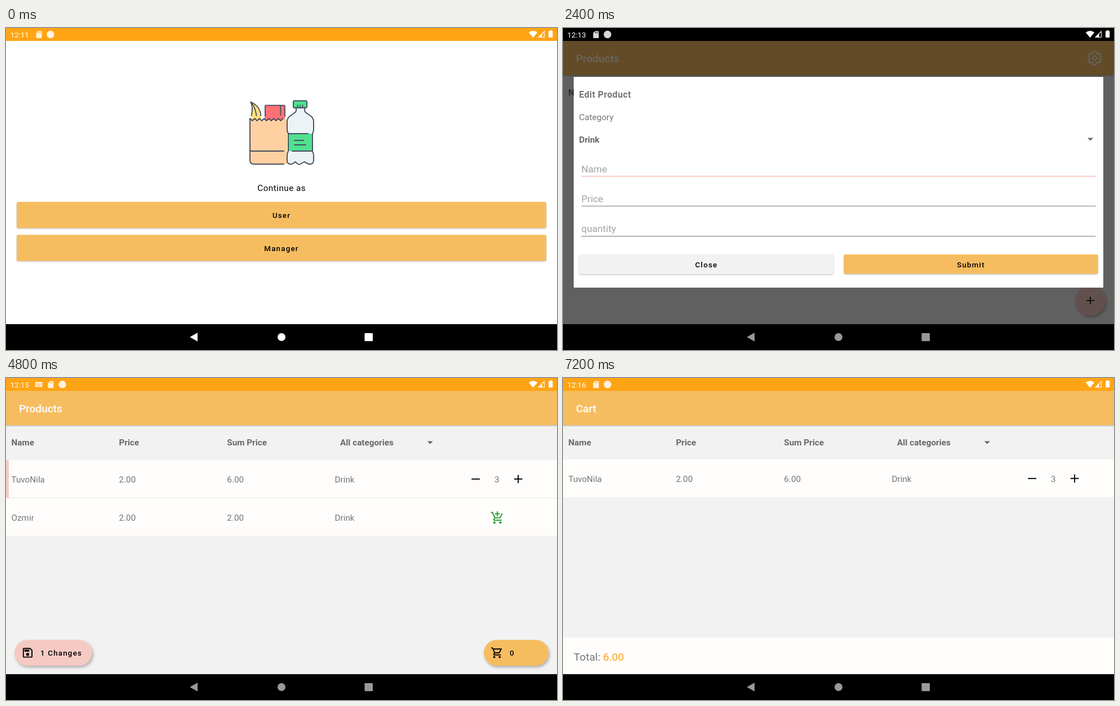
These frames come from a looping animation (978 by 573 pixels, 8400 ms). An HTML page:

```html
<!DOCTYPE html>
<html lang="en">
<head>
<meta charset="utf-8">
<title>Shop app tour</title>
<style>
  html, body { margin: 0; width: 100%; height: 100%; overflow: hidden; background: #fff; }
  svg { display: block; width: 978px; height: 573px; font-family: Roboto, sans-serif; }
  text { white-space: pre; }
  .low { filter: drop-shadow(0 1px 1px rgba(0,0,0,.28)); }
  .bar { filter: drop-shadow(0 1px 1.2px rgba(0,0,0,.3)); }
  .high { filter: drop-shadow(2px 3px 2.5px rgba(0,0,0,.28)); }
</style>
</head>
<body>
<svg id="stage" viewBox="0 0 978 573"></svg>
<script>
const STEP = 1200;
const AMBER = '#f6bd60', ORANGE = '#ffa414', PINK = '#f5cac3';
const PAPER = '#f2f2f2', ROW = '#fffdfc', GREY = '#757575', INK = '#464c5e';
const DRINKS = ['TuvoNila', 'Ozmir'];
const stage = document.getElementById('stage');

const rect = (x, y, w, h, fill, more = '') =>
  `<rect x="${x}" y="${y}" width="${w}" height="${h}" fill="${fill}" ${more}/>`;
const fillPath = (d, fill, more = '') => `<path d="${d}" fill="${fill}" ${more}/>`;
const line = (d, color, w = 2, more = '') =>
  `<path d="${d}" fill="none" stroke="${color}" stroke-width="${w}" ${more}/>`;
const circle = (x, y, r, fill, more = '') => `<circle cx="${x}" cy="${y}" r="${r}" fill="${fill}" ${more}/>`;
const at = (x, y, k, body) => `<g transform="translate(${x} ${y}) scale(${k})">${body}</g>`;

// y is the middle of the capital letters
function text(s, x, y, o = {}) {
  const { size = 15.28, weight = 400, fill = GREY, gap = 0, anchor = 'start' } = o;
  return `<text x="${x}" y="${(y + size * .355).toFixed(2)}" font-size="${size}" font-weight="${weight}"
    fill="${fill}" letter-spacing="${gap}" text-anchor="${anchor}">${s}</text>`;
}
const bold = (s, x, y, o) => text(s, x, y, { weight: 700, fill: '#686868', ...o });
const label = (s, x, y, anchor = 'start') =>
  text(s, x, y, { size: 13.37, weight: 500, fill: '#000', gap: 1.19, anchor });

function button(s, x, y, w, h, fill) {
  return rect(x, y, w, h, fill, 'rx="3" class="low"') + label(s, x + w / 2, y + h / 2 + .5, 'middle');
}

function statusBar(clock, keys, bg) {
  const x = keys ? 21 : 0, white = '#fff';
  let out = rect(0, 0, 978, 23, bg) + text(clock, 7.5, 12, { size: 13.37, fill: white });
  let icons = '';
  if (keys) {
    icons += rect(52, 7, 12.5, 9, white, 'rx="1"');
    for (let i = 0; i < 4; i++) icons += rect(54 + i * 2.5, 9, 1.2, 1.2, bg) + rect(54 + i * 2.5, 11, 1.2, 1.2, bg);
    icons += rect(56, 13.2, 4.5, 1.2, bg);
  }
  icons += fillPath(`M${x + 57} 5.5h5.5q1 0 1 1v10.500q0 1-1 1h-8q-1 0-1-1v-8z`, white)
    + line(`M${x + 57.5} 7v2.500M${x + 59.500} 7v2.500M${x + 61.5} 7v2.500`, bg, .8)
    + circle(x + 79, 11.5, 6.7, white);
  out += `<g opacity=".85">${icons}</g>`;
  return out + fillPath('M935.5 17.2L927.8 8Q935.5 2 943.2 8Z', white)
    + line('M955.4 6.2V16.5H945.2Z', white, 1.1) + fillPath('M951.5 9.500V17H944Z', white)
    + rect(963, 5.3, 7.3, 11.8, white, 'rx="1"') + rect(965, 4, 3.3, 2, white);
}

function navBar(fill) {
  return rect(0, 527, 978, 46, '#000')
    + fillPath('M326.300 550L340 542.2V557.8Z', fill)
    + circle(489, 550, 7, fill) + rect(636.5, 543, 14.5, 14.2, fill, 'rx="1"');
}

function gear() {
  const pts = [];
  for (let i = 0; i < 6; i++)
    for (const [off, r] of [[-19, 9.2], [-15, 12.4], [15, 12.4], [19, 9.2]]) {
      const a = (i * 60 - 90 + off) * Math.PI / 180;
      pts.push((943.5 + r * Math.cos(a)).toFixed(2) + ' ' + (53.5 + r * Math.sin(a)).toFixed(2));
    }
  return line('M' + pts.join('L') + 'Z', '#fff', 1.8, 'stroke-linejoin="round"')
    + `<circle cx="943.5" cy="53.5" r="3.700" fill="none" stroke="#fff" stroke-width="1.8"/>`;
}

const appBar = (title, tool = '') => rect(0, 84, 978, 443, PAPER)
  + rect(0, 23, 978, 61, AMBER, 'class="bar"')
  + text(title, 22.9, 54.7, { size: 19.1, weight: 500, fill: '#fff' }) + tool;

const caret = (x, y) => fillPath(`M${x - 5} ${y - 2.5}h10l-5 5z`, '#666');
const plus = (x, y, r, w = 1.9) => line(`M${x - r} ${y}h${2 * r}M${x} ${y - r}v${2 * r}`, '#000', w);
const addDisc = () => circle(936, 485, 27, PINK, 'class="high"');
const addButton = () => addDisc() + plus(936, 485, 6.7, 1.7);

const columns = third => bold('Name', 9.5, 115) + bold('Price', 200.5, 115)
  + bold(third, 392.3, 115) + bold('All categories', 593, 115) + caret(752.8, 115);

function row(y, cells, tools) {
  const xs = [9.5, 200.5, 392.3, 583.5];
  return rect(0, y, 978, 67, ROW) + cells.map((s, i) => text(s, xs[i], y + 34.3)).join('') + tools;
}
const divider = () => rect(0, 213, 978, 1, '#e6e6e6');

function editTools(y) {
  const blue = '#0b97d3', red = '#ee4340';
  return line(`M847 ${y - 7.5}h-9q-1.300 0-1.300 1.300v16q0 1.300 1.300 1.300h15.500q1.300 0 1.300-1.300v-8`, blue, 1.9)
    + line(`M842.5 ${y + 5.5}l1-4.5 9.300-9.300 3.500 3.500-9.300 9.300z`, blue, 1.7, 'stroke-linejoin="round"')
    + fillPath(`M851.8 ${y - 7.2}l2.600-2.600q1-.8 2 0l1.500 1.500q.8 1 0 2l-2.600 2.600z`, blue)
    + line(`M889 ${y - 7.7}h17.500M894.5 ${y - 8}v-2h6.500v2M891 ${y - 7}v15q0 1.300 1.300 1.300h11q1.300 0 1.300-1.300v-15M895.7 ${y - 4.5}v10.500M899.8 ${y - 4.5}v10.500`, red, 1.5);
}

const stepper = (x, y) => line(`M${x - 45} ${y}h14.800`, '#000', 1.9)
  + text('3', x, y + .5, { anchor: 'middle' }) + plus(x + 37.8, y, 7.3);

const WHEELS = 'M7 18c-1.1 0-1.99.9-1.99 2S5.9 22 7 22s2-.9 2-2-.9-2-2-2zM17 18c-1.1 0-1.99.9-1.99 2s.89 2 1.99 2 2-.9 2-2-.9-2-2-2z';
const CART = WHEELS + 'M15.55 13c.75 0 1.41-.41 1.75-1.03l3.58-6.49A1 1 0 0 0 20 4H5.21l-.94-2H1v2h2l3.6 7.59-1.35 2.44C4.52 15.37 5.48 17 7 17h12v-2H7l1.1-2zM6.16 6h12.15l-2.76 5H8.53z';
const CART_ADD = WHEELS + 'M11 9h2V6h3V4h-3V1h-2v3H8v2h3zM7.17 14.75l.03-.12.9-1.63h7.45c.75 0 1.41-.41 1.75-1.03l3.86-7.01L19.42 4l-3.87 7H8.53L4.27 2H1v2h2l3.6 7.59-1.35 2.45c-.16.28-.25.61-.25.96 0 1.1.9 2 2 2h12v-2H7.42q-.25 0-.25-.25z';
const SAVE = 'M17 3H5c-1.11 0-2 .9-2 2v14c0 1.1.89 2 2 2h14c1.1 0 2-.9 2-2V7zM19 19H5V5h11.17L19 7.83zM12 12c-1.66 0-3 1.34-3 3s1.34 3 3 3 3-1.34 3-3-1.34-3-3-3zM6 6h9v4H6z';

function pill(x, w, fill, icon, s) {
  return rect(x, 466, w, 46, fill, 'rx="23" class="high"')
    + at(x + 12, 477.5, .955, fillPath(icon, '#000', 'fill-rule="evenodd"')) + label(s, x + 46, 489.2);
}

function groceries() {
  const round = 'stroke-linecap="round" stroke-linejoin="round"';
  let teeth = 'M433 161';
  for (let i = 0; i < 7; i++) teeth += 'l4.200 4 4.200-4';
  const bottle = 'M515 142V147C515 153 499 154 499 167V180Q499 185 501 188V219Q498.500 224 499 230V235'
    + 'Q499 242.300 505 242.300Q510 242 514 238Q518.500 244.500 522.500 242Q526 240 530 238'
    + 'Q535 242.300 540 242.300Q546 242 546 235V230Q546.500 224 544 219V188Q546 185 546 180V167C546 154 530 153 530 147V142Z';
  return fillPath('M434 131C446 136 453 147 453 165H434Q439 147 434 131Z', '#ffe07d')
    + line('M434 131.500C445 136 451.500 145 452.500 156M434.500 132Q439 143 435.500 156M435 132Q443 142 444.500 156', INK, 1.8, round)
    + rect(459.5, 137.5, 35.5, 28, '#ff7174', 'rx="2"')
    + line('M460 157V139.500Q460 137.700 462 137.700H493Q495 137.700 495 139.500V157M487.300 138V155', INK, 1.8, round)
    + fillPath(teeth + 'L499 163V242H440Q433 242 433 235Z', '#ffd0a1')
    + line(teeth, INK, 1.8, round)
    + line('M433 161V235Q433 242.300 440 242.300H493M433 219H493', INK, 1.9, round)
    + fillPath(bottle, '#ecf3f7') + rect(500.5, 188, 44, 31, '#50e08f')
    + line(bottle, INK, 1.9, round)
    + line('M502 188H536M508 219H543M512 200H528M512 208H532', INK, 1.8, round)
    + rect(510, 129.5, 24, 12.5, '#50e08f', `rx="2" stroke="${INK}" stroke-width="1.9"`)
    + line('M517.500 137V141M522 137V141M526.500 137V141', INK, 1.5, round);
}

const dim = () => rect(0, 23, 978, 504, '#000', 'opacity=".6"');
const field = (s, y) => text(s, 32.5, y, { size: 17.2, fill: '#a3a3a3' });

function welcome() {
  return rect(0, 0, 978, 573, '#fff') + groceries()
    + text('Continue as', 489.2, 284.3, { fill: '#000', gap: .478, anchor: 'middle' })
    + button('User', 19, 309.5, 940, 46.5, AMBER) + button('Manager', 19, 368, 940, 46.5, AMBER)
    + statusBar('12:11', false, ORANGE) + navBar('#fff');
}

function newCategory() {
  return appBar('Categories') + text('Default', 19.1, 116, { gap: .14 })
    + addDisc() + dim() + plus(936, 485, 6.7, 1.7)
    + rect(19, 180.5, 940, 188, '#fff')
    + bold('New Category', 38.2, 211.5, { size: 15.8, gap: .45, fill: GREY })
    + text('Drink', 41.6, 263.7, { size: 17.2, fill: '#212121' })
    + rect(80.5, 250, 1.2, 23, PINK) + rect(42, 276.2, 894, 1.4, '#f3bdb5')
    + button('Close', 38.5, 309, 441.5, 35, PAPER) + button('Submit', 498.5, 309.5, 441.5, 34.5, AMBER)
    + statusBar('12:12', true, '#000') + navBar('#fff');
}

function editProduct() {
  return appBar('Products', gear()) + bold('Name', 9.5, 115)
    + addDisc() + dim() + plus(936, 485, 6.7, 1.7)
    + rect(19, 87, 940, 375, '#fff')
    + bold('Edit Product', 28.5, 118, { size: 15.8, gap: .45, fill: GREY })
    + text('Category', 28.5, 158.5) + bold('Drink', 28.5, 198.3) + caret(936, 198)
    + field('Name', 250.5) + field('Price', 304) + field('quantity', 357.3)
    + rect(32.5, 263, 913, 1.5, '#f3bdb5') + rect(32.5, 316.4, 913, 1, GREY) + rect(32.5, 370, 913, 1, GREY)
    + button('Close', 29, 403, 451, 35, PAPER) + button('Submit', 498.5, 403, 451, 34.5, AMBER)
    + statusBar('12:13', false, '#000') + navBar('#999');
}

function stock() {
  return appBar('Products', gear()) + columns('quantity')
    + row(146, [DRINKS[0], '2.00', '10', 'Drink'], editTools(180))
    + row(214, [DRINKS[1], '2.00', '15', 'Drink'], editTools(248.8)) + divider()
    + addButton() + statusBar('12:15', true, ORANGE) + navBar('#999');
}

function shop(clock, saved) {
  return appBar('Products') + columns('Sum Price')
    + row(146, [DRINKS[0], '2.00', '6.00', 'Drink'], stepper(871.3, 179.8))
    + row(214, [DRINKS[1], '2.00', '2.00', 'Drink'], at(859.6, 236.2, 1.05, fillPath(CART_ADD, '#2ea132')))
    + divider() + rect(0, 146, 5, 67, saved ? AMBER : PINK)
    + (saved ? '' : pill(15, 138, PINK, SAVE, '1 Changes'))
    + pill(848, 115, AMBER, CART, saved ? '1' : '0')
    + statusBar(clock, !saved, ORANGE) + navBar('#999');
}

function cart() {
  return appBar('Cart') + columns('Sum Price')
    + row(145, [DRINKS[0], '2.00', '6.00', 'Drink'], stepper(870.3, 178.8))
    + rect(0, 462, 978, 65, ROW)
    + text(`Total: <tspan fill="${ORANGE}">6.00</tspan>`, 19.1, 496, { size: 19.1 })
    + statusBar('12:16', false, ORANGE) + navBar('#999');
}

const scenes = [welcome, newCategory, editProduct, stock,
  () => shop('12:15', false), () => shop('12:16', true), cart];
let shown = -1;

function draw(ms) {
  const i = Math.floor(ms / STEP) % scenes.length;
  if (i !== shown) stage.innerHTML = scenes[shown = i]();
}
function tick() {
  draw(performance.now());
  requestAnimationFrame(tick);
}
tick();
</script>
</body>
</html>
```
